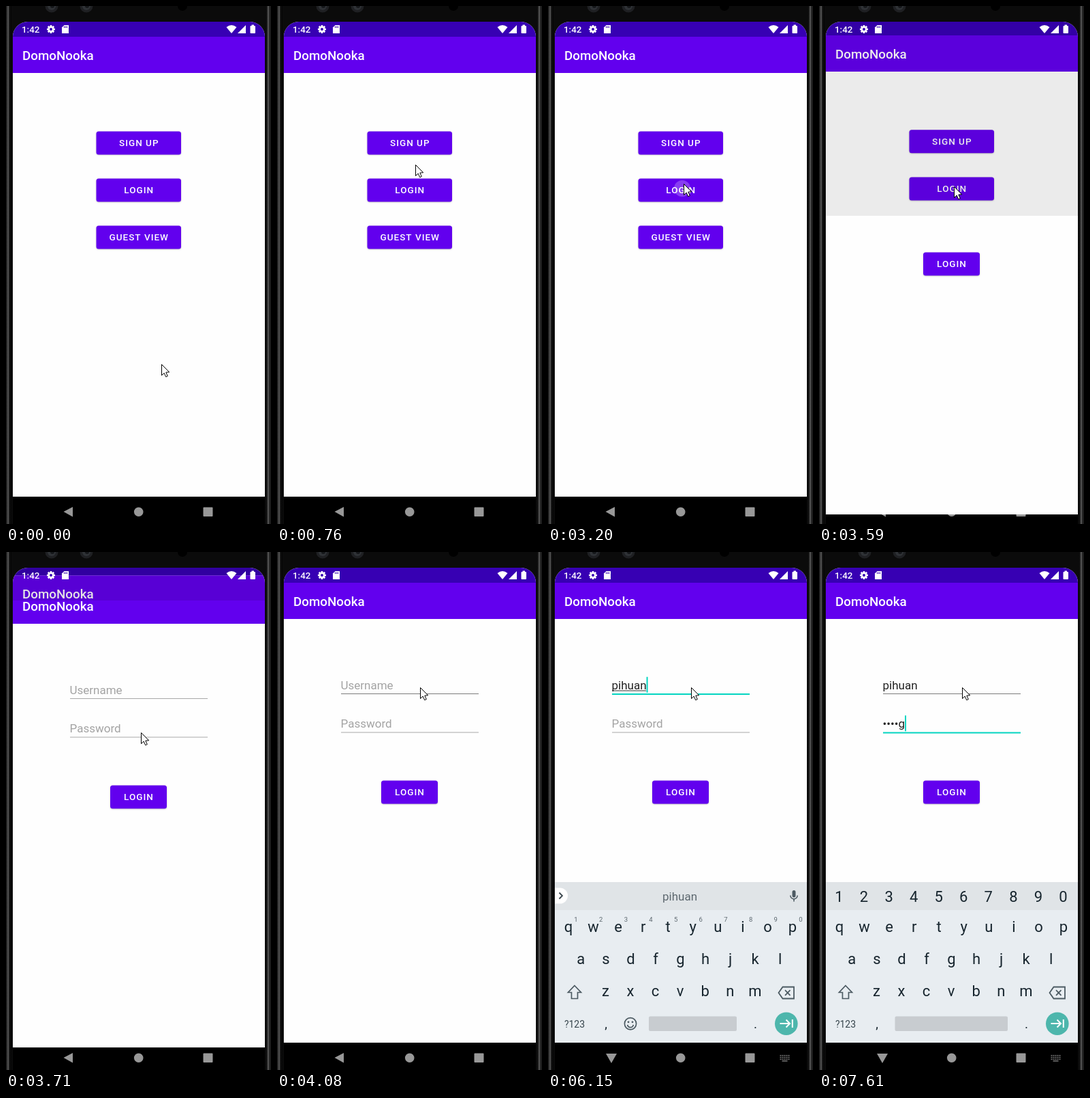
Write an HTML page with a canvas that moves like this. It is 389x758 px and loops after 8 s.

```html
<!DOCTYPE html>
<html lang="en">
<head>
<meta charset="utf-8">
<title>Login demo</title>
<style>
  html, body { margin: 0; width: 100%; height: 100%; overflow: hidden; background: #0b0b0b; }
  canvas { display: block; width: 389px; height: 758px; }
</style>
</head>
<body>
<canvas id="stage" width="389" height="758"></canvas>
<script>
const ctx = document.getElementById('stage').getContext('2d');
const LOOP = 8000;
const PURPLE = '#6200ee', TEAL = '#03d5c1', KEY = '#17252e', ICON = '#4c5a62', NAV = '#989898';
const SCREEN = { x: 10, y: 23, w: 370, h: 801, bottom: 718 };
const USER = 'pihuan', PASS = 'kodug';
const USER_TIMES = [5370, 5490, 5600, 5720, 5970, 6150];
const PASS_TIMES = [6990, 7240, 7360, 7490, 7610];
const OPEN = { start: 3503, length: 425 };

// Drawing helpers
function rect(x, y, w, h, fill, r = 0) {
  ctx.fillStyle = fill;
  ctx.beginPath();
  ctx.roundRect(x, y, w, h, r);
  ctx.fill();
}

function circle(x, y, r, fill) {
  ctx.fillStyle = fill;
  ctx.beginPath();
  ctx.arc(x, y, r, 0, Math.PI * 2);
  ctx.fill();
}

function trace(points, closed) {
  ctx.beginPath();
  points.forEach(([x, y], i) => i ? ctx.lineTo(x, y) : ctx.moveTo(x, y));
  if (closed) ctx.closePath();
}

function poly(points, fill) {
  trace(points, true);
  ctx.fillStyle = fill;
  ctx.fill();
}

function line(points, color, width, closed = false) {
  trace(points, closed);
  ctx.strokeStyle = color;
  ctx.lineWidth = width;
  ctx.stroke();
}

function text(str, x, y, size, color, { weight = 400, align = 'left', spacing = 0 } = {}) {
  ctx.font = `${weight} ${size}px Roboto, sans-serif`;
  ctx.textAlign = align;
  ctx.letterSpacing = spacing + 'px';
  ctx.fillStyle = color;
  ctx.fillText(str, x, y);
  return ctx.measureText(str).width;
}

// Easing
const clamp = v => Math.min(1, Math.max(0, v));
const smooth = v => v * v * (3 - 2 * v);

function cubic(u, a, b, c, d) {
  const v = 1 - u;
  return a * v * v * v + 3 * b * u * v * v + 3 * c * u * u * v + d * u * u * u;
}

function curve(t, xs, ys) {
  let lo = 0, hi = 1;
  for (let i = 0; i < 24; i++) {
    const mid = (lo + hi) / 2;
    if (cubic(mid, ...xs) < t) lo = mid; else hi = mid;
  }
  return cubic(lo, ...ys);
}

const fastOutSlowIn = t => curve(t, [0, .4, .2, 1], [0, 0, 1, 1]);
const extraSlowIn = t => t < 1 / 6
  ? curve(t, [0, .05, .1333, .1667], [0, 0, .06, .4])
  : curve(t, [.1667, .2083, .25, 1], [.4, .82, 1, 1]);

// Phone body
function drawPhone() {
  rect(0, 0, 389, 758, '#0b0b0b');
  for (const [x, dir] of [[0, 1], [388, -1]]) {
    const g = ctx.createLinearGradient(x, 0, x + dir * 7, 0);
    g.addColorStop(0, '#1a1a1a');
    g.addColorStop(.25, '#2c2c2c');
    g.addColorStop(.45, '#666');
    g.addColorStop(.65, '#1c1c1c');
    g.addColorStop(1, '#050505');
    rect(dir > 0 ? 0 : 381, 0, 8, 758, g);
  }
  for (const x of [67, 118]) {
    circle(x, 0, 9.5, '#1f2023');
    circle(x, 0, 6, '#2f3236');
    circle(x + 1, 0, 3, '#15171a');
  }
  circle(259, 0, 7, '#000');
}

function drawStatus() {
  text('1:42', 23, 39, 13.4, '#fff', { weight: 500 });
  for (let i = 0; i < 4; i++) {
    const a = i * Math.PI / 4, dx = Math.cos(a) * 6, dy = Math.sin(a) * 6;
    line([[66 - dx, 34 - dy], [66 + dx, 34 + dy]], '#fff', 2.6);
  }
  circle(66, 34, 4.5, '#fff');
  circle(66, 34, 2, '#3700b3');
  poly([[82, 31.5], [85.5, 28], [92, 28], [92, 40], [82, 40]], '#fff');
  for (const x of [85, 87, 89]) rect(x, 29.5, 1, 2.5, '#3700b3');
  ctx.beginPath();
  ctx.moveTo(331, 40);
  ctx.lineTo(323.5, 31);
  ctx.quadraticCurveTo(331, 25, 338.5, 31);
  ctx.fillStyle = '#fff';
  ctx.fill();
  poly([[340, 40], [352, 40], [352, 28]], '#fff');
  rect(358.5, 29, 7.5, 11, '#fff', 1);
  rect(360.5, 27.5, 3.5, 2, '#fff');
}

function drawNav(keyboardUp) {
  rect(SCREEN.x, SCREEN.bottom, SCREEN.w, 41, '#000');
  poly(keyboardUp ? [[85, 734], [101, 734], [93, 748]] : [[98, 733], [98, 747.5], [84.5, 740]], NAV);
  circle(194.7, 740.3, 6.8, NAV);
  rect(289.5, 733.5, 14, 13.5, NAV, 1);
  if (!keyboardUp) return;
  for (let r = 0; r < 3; r++)
    for (let c = 0; c < 5; c++) rect(340.5 + c * 3, 736 + r * 2.7, 2, 1.6, '#777');
  rect(343.5, 744, 8, 1.5, '#777');
}

// Pages
function button(label, x, y, w) {
  ctx.save();
  ctx.shadowColor = 'rgba(0,0,0,.25)';
  ctx.shadowBlur = 2;
  ctx.shadowOffsetY = .7;
  rect(x, y, w, 34, PURPLE, 3.5);
  ctx.restore();
  text(label, x + w / 2 + .5, y + 21.8, 13.5, '#fff', { weight: 500, align: 'center', spacing: 1 });
}

function drawBase() {
  rect(SCREEN.x, SCREEN.y, SCREEN.w, SCREEN.bottom - SCREEN.y, '#fefefe');
  rect(SCREEN.x, SCREEN.y, SCREEN.w, 22, '#3700b3');
  rect(SCREEN.x, 45, SCREEN.w, 53, PURPLE);
  text('DomoNooka', 24, 78.8, 18.8, '#fff', { weight: 500 });
}

function drawHome(t) {
  drawBase();
  button('SIGN UP', 132.5, 183.4, 124.5);
  button('LOGIN', 132.5, 252.5, 124.5);
  button('GUEST VIEW', 132.5, 321.6, 124.5);
  if (t >= 3200 && t < 3560) {
    const alpha = .24 * clamp((3560 - t) / 120);
    ctx.save();
    ctx.beginPath();
    ctx.roundRect(132.5, 252.5, 124.5, 34, 3.5);
    ctx.clip();
    circle(197, 267, 12 + 60 * smooth(clamp((t - 3200) / 225)), `rgba(255,255,255,${alpha})`);
    ctx.restore();
  }
}

function field(hint, value, baseline, { focus, caret, hover, composing }) {
  const w = value ? text(value, 93.5, baseline, 17, '#212121') : 0;
  if (!value) text(hint, 93.5, baseline, 17, '#a3a3a3');
  if (composing && value) rect(94, baseline + 1.8, w - 1, 1, '#333');
  if (focus) rect(94, baseline + 6.4, 202, 2, TEAL);
  else rect(94, baseline + 6.4, 202, 1, hover ? '#7c7c7c' : '#a9a9a9');
  if (caret) rect(93.5 + w, baseline - 18, 2, 23, TEAL);
}

function drawLogin(t) {
  const typed = USER_TIMES.filter(k => t >= k).length;
  const hidden = PASS_TIMES.filter(k => t >= k).length;
  const onUser = t >= 4310 && t < 6460, onPass = t >= 6460;
  const secret = hidden ? '•'.repeat(hidden - 1) + PASS[hidden - 1] : '';
  drawBase();
  field('Username', USER.slice(0, typed), 200.7, {
    focus: onUser, caret: onUser && (t < 4870 || t >= 5370), hover: t >= 4020, composing: onUser
  });
  field('Password', secret, 257.2, { focus: onPass, caret: onPass });
  button('LOGIN', 153, 334.6, 83);
}

// Keyboard
function keys(str, x, baseline, color = KEY) {
  [...str].forEach((c, i) => text(c, x + i * 36.55, baseline, 22, color, { align: 'center' }));
}

function drawStrip(t) {
  const word = USER.slice(0, USER_TIMES.filter(k => t >= k).length);
  const label = (s, x) => text(s, x, 510, 17, '#5d686f', { align: 'center' });
  ctx.save();
  ctx.beginPath();
  ctx.rect(10, 483, 370, 41);
  ctx.clip();
  rect(0, 491.5, 29, 23, '#fff', 11.5);
  ctx.restore();
  line([[16.5, 498.5], [21, 503], [16.5, 507.5]], '#3c474e', 1.8);
  if (word) label(word, 193.5);
  else {
    label('thanks', 92);
    label('I', 193.5);
    label('we', 294.5);
    rect(140, 492, 1, 23, '#c5cacd');
    rect(247, 492, 1, 23, '#c5cacd');
  }
  rect(358.5, 495, 5, 10.5, ICON, 2.5);
  ctx.strokeStyle = ICON;
  ctx.lineWidth = 1.5;
  ctx.beginPath();
  ctx.arc(361, 502.5, 5.2, 0, Math.PI);
  ctx.stroke();
  rect(360.2, 507.5, 1.6, 4, ICON);
}

function drawKeyboard(t) {
  const secret = t >= 6520;
  rect(10, 483, 370, SCREEN.bottom - 483, '#e8edf1');
  rect(10, 483, 370, 41, '#e0e4e7');
  if (secret) keys('1234567890', 29.5, 512);
  else drawStrip(t);
  keys('qwertyuiop', 30, 556);
  if (!secret)
    [...'1234567890'].forEach((c, i) => text(c, 41 + i * 36.65, 540.5, 9.5, '#5d686f', { align: 'center' }));
  keys('asdfghjkl', 48.3, 603);
  keys('zxcvbnm', 84.5, 650);

  line([[39, 634.5], [48.5, 644.5], [43.5, 644.5], [43.5, 653.5], [34.5, 653.5], [34.5, 644.5], [29.5, 644.5]],
    ICON, 1.7, true);
  line([[338.5, 645], [344.5, 636.5], [361, 636.5], [361, 653.5], [344.5, 653.5]], ICON, 1.8, true);
  line([[348, 641.2], [355.5, 648.8]], ICON, 1.8);
  line([[355.5, 641.2], [348, 648.8]], ICON, 1.8);

  text('?123', 39, 695.5, 14, '#37454d', { align: 'center' });
  text(',', 85, 696.5, 19, KEY, { align: 'center' });
  text('.', 304.5, 696.5, 19, KEY, { align: 'center' });
  const left = secret ? 111.5 : 148;
  rect(left, 679.5, 277 - left, 21.5, '#c8ccd0', 2);
  if (!secret) {
    ctx.strokeStyle = ICON;
    ctx.lineWidth = 1.7;
    ctx.beginPath();
    ctx.arc(121, 690.3, 8.6, 0, Math.PI * 2);
    ctx.stroke();
    circle(118, 687.8, 1.4, ICON);
    circle(124, 687.8, 1.4, ICON);
    ctx.beginPath();
    ctx.arc(121, 691.3, 4.4, .15, Math.PI - .15);
    ctx.stroke();
  }
  circle(349.8, 690.2, 16.8, '#4db6ac');
  line([[340.5, 690], [354.5, 690]], '#fff', 2);
  line([[349.5, 684.5], [355, 690], [349.5, 695.5]], '#fff', 2);
  line([[358.8, 684], [358.8, 696]], '#fff', 2);
}

// Pointer: [time, x, y]
const PATH = [
  [125, 228, 524], [880, 201, 211], [1200, 201, 211], [1640, 199, 259.5],
  [3200, 199, 259.5], [3500, 197.5, 264], [3860, 197.5, 264],
  [3960, 203, 246], [3990, 203, 246], [4080, 210, 198]
];

function drawPointer(t) {
  let [, x, y] = PATH[0];
  for (let i = 1; i < PATH.length; i++) {
    const [t0, x0, y0] = PATH[i - 1], [t1, x1, y1] = PATH[i];
    if (t < t0) break;
    const p = smooth(clamp((t - t0) / (t1 - t0)));
    x = x0 + (x1 - x0) * p;
    y = y0 + (y1 - y0) * p;
  }
  ctx.save();
  ctx.translate(Math.round(x) + .5, Math.round(y) + .5);
  const shape = [[0, 0], [0, 16], [3.7, 12.6], [6.2, 18.2], [8.8, 17], [6.3, 11.6], [11.2, 11.3]];
  poly(shape, '#fff');
  line(shape, '#000', 1, true);
  ctx.restore();
}

// The new page rises and is uncovered from the bottom; the old one lifts and dims
function drawOpening(t) {
  const p = clamp((t - OPEN.start) / OPEN.length);
  const move = fastOutSlowIn(p), reveal = extraSlowIn(p);
  const offset = 30.6 * (1 - move);
  ctx.save();
  ctx.translate(0, -14 * move);
  drawHome(t);
  rect(SCREEN.x, SCREEN.y, SCREEN.w, SCREEN.bottom - SCREEN.y, `rgba(0,0,0,${.11 * reveal})`);
  ctx.restore();
  ctx.save();
  ctx.beginPath();
  ctx.rect(SCREEN.x, Math.round(SCREEN.y + offset + .959 * SCREEN.h * (1 - reveal)), SCREEN.w, SCREEN.h);
  ctx.clip();
  ctx.translate(0, Math.round(offset));
  drawLogin(t);
  ctx.restore();
}

function draw(t) {
  const keyboardUp = t >= 4460;
  drawPhone();
  ctx.save();
  ctx.beginPath();
  ctx.roundRect(SCREEN.x, SCREEN.y, SCREEN.w, SCREEN.h, 22);
  ctx.clip();
  drawNav(keyboardUp);
  if (t < OPEN.start) drawHome(t);
  else if (t < OPEN.start + OPEN.length) drawOpening(t);
  else drawLogin(t);
  drawStatus();
  if (keyboardUp) {
    const p = clamp((t - 4460) / 210);
    ctx.globalAlpha = clamp(p * 1.6);
    ctx.translate(0, 24 * (1 - p) ** 3);
    drawKeyboard(t);
  }
  ctx.restore();
  drawPointer(t);
}

const began = performance.now();
function tick() {
  draw((performance.now() - began) % LOOP);
  requestAnimationFrame(tick);
}
tick();
</script>
</body>
</html>
```
